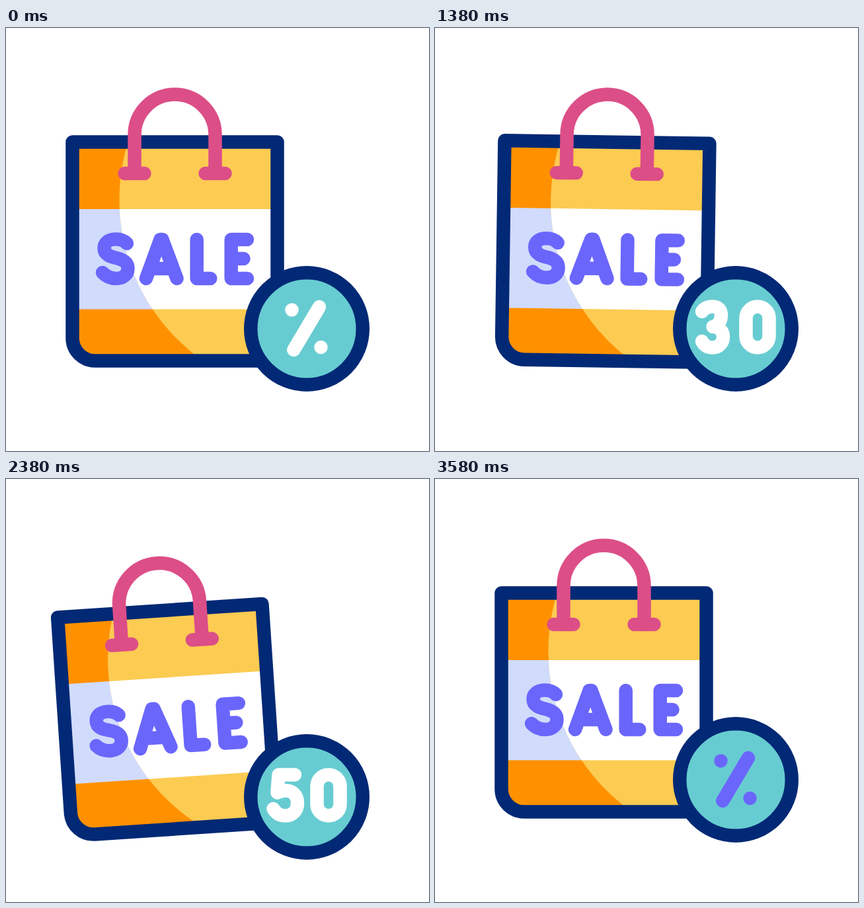
An HTML page that plays this animation: 640x640 px, repeating every 3.6 s.

```html
<!DOCTYPE html>
<html lang="en">
<head>
<meta charset="utf-8">
<title>Sale bag</title>
<style>
  html, body { margin: 0; width: 100%; height: 100%; overflow: hidden; background: #fff; }
  svg { display: block; width: 100vw; height: 100vh; }
  .line { fill: none; stroke-width: 20.5; stroke-linecap: round; stroke-linejoin: round; }
  .navy { stroke: #022975; }
  .pink { stroke: #dc4e87; }
  .violet { stroke: #6a66fb; }
  .white { stroke: #fff; }
</style>
</head>
<body>
<svg viewBox="0 0 640 640" role="img" aria-label="SALE">
  <defs>
    <path id="body" d="M100.5 172.5H410.5V503.5H135A34.5 34.5 0 0 1 100.5 469Z"/>
    <clipPath id="inBag"><use href="#body"/></clipPath>
    <clipPath id="inBadge"><circle cx="455" cy="455" r="76"/></clipPath>
    <!-- A zero-length round-capped line makes each dot -->
    <path id="percent" d="M435.3 487L474 422M432.5 426.5h.01M476.5 483h.01"/>
    <path id="zero" d="M470.5 439a17.5 17.5 0 0 1 35 0v27a17.5 17.5 0 0 1 -35 0z"/>
  </defs>

  <g id="bag">
    <g clip-path="url(#inBag)">
      <path fill="#ff9100" d="M95 165H415V510H95Z"/>
      <path fill="#d1dbfc" d="M95 274H415V425.5H95Z"/>
      <clipPath id="lit"><circle cx="469" cy="260" r="297.5"/></clipPath>
      <g clip-path="url(#lit)">
        <path fill="#fccb52" d="M95 165H415V510H95Z"/>
        <path fill="#fff" d="M95 274H415V425.5H95Z"/>
      </g>
    </g>
    <use href="#body" class="line navy"/>
    <path class="line pink" d="M194.5 220V161.5A61 61 0 0 1 316.5 161.5V220M179.5 220H209.5M301.5 220H331.5"/>
    <g class="line violet">
      <path d="M183 326C178 320.5 171 319.5 166 319.5C154 319.5 148.5 326 148.5 333C148.5 344 160 346.5 167 348C177 350.5 184.5 354 184.5 364C184.5 374 176 379 167 379C158 379 151 375.5 146 370"/>
      <path d="M212 379L233.5 320H236.5L258.5 379M221 364H249"/>
      <path d="M288.7 320V379H309.3"/>
      <path d="M365 320H340.7V379H365M340.7 349H359.5"/>
    </g>
  </g>

  <g id="badge">
    <circle cx="455" cy="455" r="80" fill="#67ccd1"/>
    <g clip-path="url(#inBadge)" class="line">
      <use id="first" href="#percent" class="white"/>
      <g id="thirty" class="white">
        <path d="M404 429C408 423 414 421.5 420 421.5C429 421.5 433 427 433 434.5C433 443 428 451 420.5 452C430 452 436 459 436 467C436 477 429 483.5 420 483.5C412 483.5 407 480 404 474"/>
        <use href="#zero"/>
      </g>
      <g id="fifty" class="white">
        <path d="M437 421.5H412.5L410.5 448.5C415 446 420 445.5 424 445.5C434 445.5 441 453 441 464.5C441 476 433 483.5 423 483.5C414 483.5 408 479.5 404.5 473"/>
        <use href="#zero"/>
      </g>
      <use id="last" href="#percent" class="violet"/>
    </g>
    <circle cx="455" cy="455" r="84.75" class="line navy"/>
  </g>
</svg>
<script>
const LOOP = 3600, TICK = 20, DROP = 29.5;
const $ = id => document.getElementById(id);
const ease = p => (1 - Math.cos(Math.PI * p)) / 2;

// Eased value at tick n along [tick, value] keys
function track(keys, n) {
  const i = keys.findIndex(k => k[0] > n);
  if (i < 0) return keys[keys.length - 1][1];
  if (i === 0) return keys[0][1];
  const [a, from] = keys[i - 1], [b, to] = keys[i];
  return from + (to - from) * ease((n - a) / (b - a));
}

// Falls in from above
const enter = (start, end, from) => [[start, from], [end, 0]];
// Lifts a little, then falls out below
const leave = start => [[start, 0], [start + 6, -12], [start + 18, 140]];

const height = [
  [22, 0], [43, DROP], [46, DROP], [61, 0],
  [91, 0], [112, DROP], [115.6, DROP], [131, 0],
  [148, 0], [165, DROP], [179, 0]
];
const tilt = [
  [22, 0], [43, -5], [46, -5], [61, 5], [79, -5], [94, 5],
  [112, -5], [115.6, -5], [131, 5], [146, -5], [160, 0]
];
const labels = {
  first: leave(0),
  thirty: [...enter(22, 43, -141), ...leave(79)],
  fifty: [...enter(91, 112, -141), ...leave(143)],
  last: enter(148, 165, -147)
};

const move = (id, value) => $(id).setAttribute("transform", value);

function draw(ms) {
  const n = (ms % LOOP) / TICK;
  const y = track(height, n);
  move("bag", `translate(0 ${y}) rotate(${track(tilt, n)} 255.5 514)`);
  move("badge", `translate(0 ${y})`);
  for (const id in labels) move(id, `translate(0 ${track(labels[id], n)})`);
}

const start = performance.now();
function loop(now) {
  draw(Math.max(0, now - start));
  requestAnimationFrame(loop);
}
draw(0);
requestAnimationFrame(loop);
</script>
</body>
</html>
```
